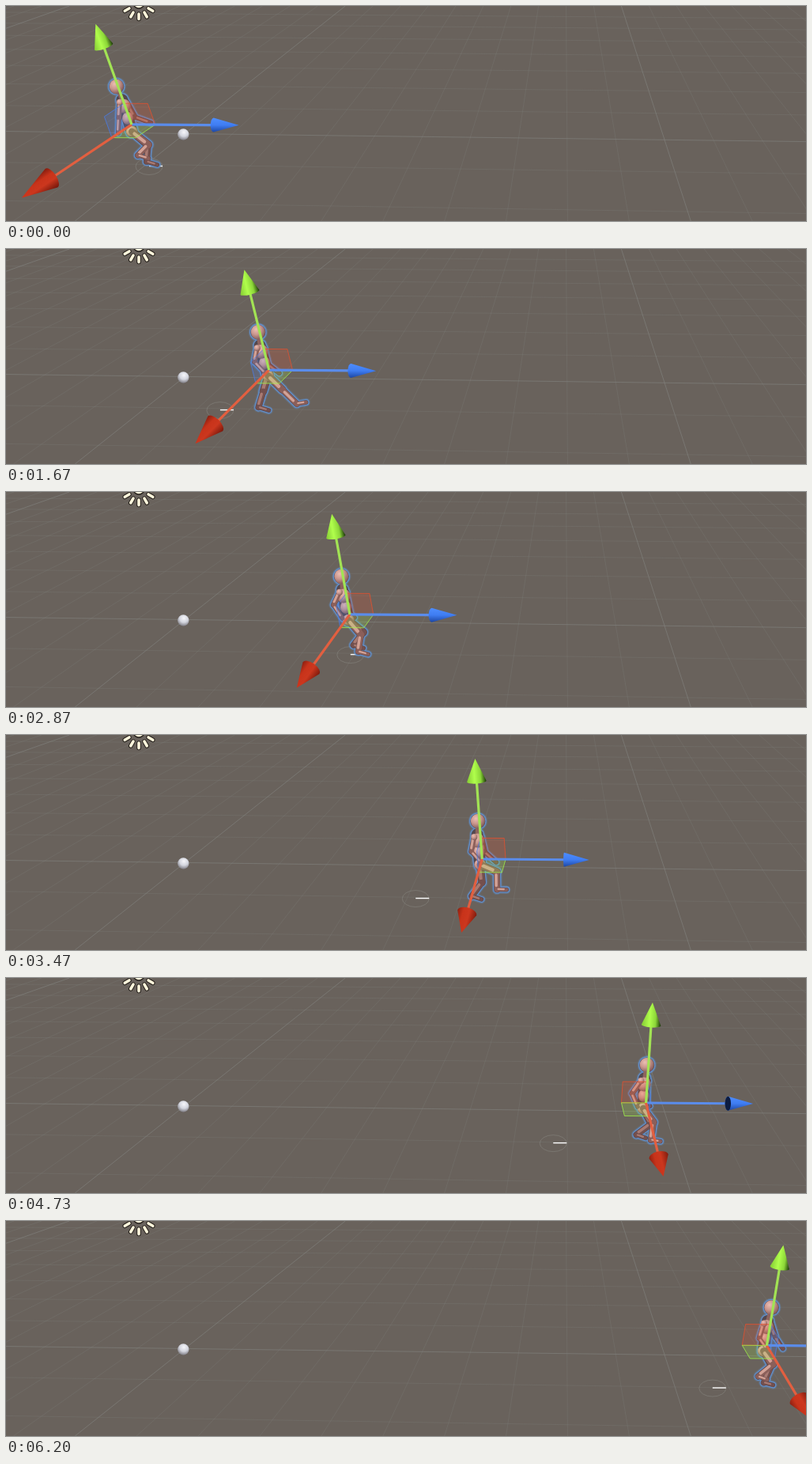
An HTML page that plays this animation: 1012x272 px, repeating every 6.27 s.

```html
<!DOCTYPE html>
<html lang="en">
<head>
<meta charset="utf-8">
<title>Walking figure in a 3D scene</title>
<style>
html, body { margin: 0; width: 100%; height: 100%; overflow: hidden; background: #69625c; }
svg { display: block; width: 1012px; height: 272px; }
</style>
</head>
<body>
<svg viewBox="0 0 1012 272" xmlns="http://www.w3.org/2000/svg">
  <defs>
    <radialGradient id="ball" cx=".55" cy=".3" r=".75">
      <stop offset="0" stop-color="#f6f6fa"/><stop offset=".5" stop-color="#d3d5de"/><stop offset="1" stop-color="#6f6d74"/>
    </radialGradient>
    <radialGradient id="skin" cx=".36" cy=".32" r=".8">
      <stop offset="0" stop-color="#ecbdb2"/><stop offset=".45" stop-color="#c9968d"/><stop offset="1" stop-color="#6d4a4b"/>
    </radialGradient>
    <linearGradient id="red" gradientUnits="userSpaceOnUse" x1="0" y1="-13" x2="0" y2="13">
      <stop offset="0" stop-color="#7d1a0d"/><stop offset=".4" stop-color="#cc371e"/><stop offset=".7" stop-color="#c8331a"/><stop offset="1" stop-color="#8c1f10"/>
    </linearGradient>
    <linearGradient id="green" gradientUnits="userSpaceOnUse" x1="0" y1="-12" x2="0" y2="12">
      <stop offset="0" stop-color="#86cc35"/><stop offset=".4" stop-color="#b0fe4c"/><stop offset=".72" stop-color="#8cd638"/><stop offset="1" stop-color="#1c390a"/>
    </linearGradient>
    <linearGradient id="blue" gradientUnits="userSpaceOnUse" x1="0" y1="-9" x2="0" y2="9">
      <stop offset="0" stop-color="#4d8dff"/><stop offset=".5" stop-color="#3f7df2"/><stop offset="1" stop-color="#1d47a4"/>
    </linearGradient>
  </defs>
  <rect width="1012" height="272" fill="#69625c"/>
  <g id="grid" fill="none"></g>
  <g id="sun" stroke-linecap="round"></g>
  <circle cx="224.3" cy="162.5" r="7.2" fill="url(#ball)"/>
  <g id="ring" fill="none">
    <ellipse rx="17" ry="10.5" stroke="#8e8f88" stroke-opacity=".45"/>
    <path d="M0-.5H17" stroke="#fff" stroke-width="1.4"/>
  </g>
  <g id="body" stroke-linecap="round" stroke-linejoin="round"></g>
  <g id="gizmo"></g>
</svg>
<script>
const LOOP = 6270, STEP = 66.62;
const IDLE = 1130, WALK = 1890, CYCLE = 955;
const { sin, cos, max, min, PI, hypot, sqrt } = Math;
const el = id => document.getElementById(id);
const add = (...v) => v.reduce((a, b) => [a[0] + b[0], a[1] + b[1]]);
const mul = (v, k) => [v[0] * k, v[1] * k];
const mix = (a, b, k) => add(mul(a, 1 - k), mul(b, k));

// Horizontal sideways lean of the vertical axis, caused by perspective
const leanAt = x => -45 + .083 * (x - 167);

// Middle joint of a limb with two equal bones
function bend(a, b, len, side) {
  const v = add(b, mul(a, -1)), d = hypot(...v);
  const out = sqrt(max(0, len * len - d * d / 4)) * side / d;
  return add(mix(a, b, .5), [v[1] * out, -v[0] * out]);
}

// Joints around the figure's centre; w is the gait angle, k the crouch
function pose(w, k) {
  const go = 1 - k;
  const head = [-2, -48], neck = [-4 + 3 * k, -31], hip = [-3, 7 + 2 * k];
  const leg = (w, shift) => {
    const s = sin(w - .25) * go, lift = max(0, cos(w - .6)) * go;
    const ankle = add([25 * s, 47 - 9 * lift], mul(shift, k));
    return [hip, bend(hip, ankle, 22.5, 1), ankle, add(ankle, [12, 4 - 6 * max(0, s)])];
  };
  const arm = (dx, hand) => {
    const shoulder = add(neck, [dx, 3]);
    return [shoulder, bend(shoulder, hand, 19, -1), hand];
  };
  const c = cos(w) * go;
  return {
    spine: [head, neck, hip],
    farLeg: leg(w, [2, 0]), nearLeg: leg(w + PI, [-6, -8]),
    farArm: arm(5, [13 - 8 * c + 12 * k, 4 - 6 * k]),
    nearArm: arm(-4, [-4 - 6 * c - 17 * k, 5 + 6 * k])
  };
}

function drawGrid() {
  const vx = 707, vy = -221;
  let h = '';
  const line = (x1, y1, x2, y2, major) => {
    h += `<path d="M${x1} ${y1}L${x2} ${y2}" stroke="#858883" stroke-opacity="${major ? .55 : .22}"/>`;
  };
  for (let k = -16; k < 20; k++) {
    const m = -1.257 + .158 * k;
    line(vx - m * vy, 0, vx + m * (272 - vy), 272, k % 10 === 0);
  }
  for (let k = -2; k < 8; k++) {
    const d = 386 / (1 + .094 * k), r = .0129 * d / 386;
    line(0, d + vy - 500 * r, 1012, d + vy + 512 * r, k === 0);
  }
  el('grid').innerHTML = h;
}

function drawSun() {
  let rays = '';
  for (let a = -PI / 3; a < 1.1; a += PI / 6) {
    rays += `M${168 + 14 * sin(a)} ${-4 + 14 * cos(a)}L${168 + 20.5 * sin(a)} ${-4 + 20.5 * cos(a)}`;
  }
  el('sun').innerHTML =
    `<path d="${rays}" stroke="#25211c" stroke-width="5.6"/><path d="${rays}" stroke="#fff6dc" stroke-width="3.6"/>` +
    '<circle cx="168" cy="-4" r="7" fill="#fff6dc" stroke="#25211c" stroke-width="1.5"/>';
}

function drawBody(x, y, w, k) {
  const lean = leanAt(x) / 127;
  const place = list => list.map(([px, py]) => [x + px - py * lean, y + py]);
  const { spine, farLeg, nearLeg, farArm, nearArm } = pose(w, k);
  const [head, neck, hip] = place(spine);
  const bones = (list, ...widths) => {
    const p = place(list);
    return widths.map((w, i) => [p[i], p[i + 1], w]);
  };
  const far = [...bones(farLeg, 8.5, 7, 4.5), ...bones(farArm, 6, 5)];
  const near = [...bones(nearLeg, 8.5, 7, 4.5), ...bones(nearArm, 6, 5)];
  const line = (a, b, w, c) => `<path d="M${a}L${b}" stroke="${c}" stroke-width="${w}"/>`;
  const oval = (c, rx, ry = rx, fill = 'url(#skin)') =>
    `<ellipse cx="${c[0]}" cy="${c[1]}" rx="${rx}" ry="${ry}" fill="${fill}"/>`;
  const limbs = (list, dark, light) => list.map(([a, b, w]) => {
    const shine = q => add(q, [-1, -.6]);
    return line(a, b, w, dark) + line(shine(mix(a, b, .2)), shine(mix(a, b, .8)), w * .5, light) +
      oval(b, w * .4, w * .4, dark);
  }).join('');
  const shell = (grow, c) => [...far, ...near, [neck, hip, 14]]
    .map(([a, b, w]) => line(a, b, w + grow, c)).join('') + oval(head, 9 + grow / 2, 9 + grow / 2, c);

  el('body').innerHTML =
    `<g opacity=".35">${shell(6, '#5f8fca')}</g>` + shell(3.6, '#6390ca') + shell(1, '#54484e') +
    limbs(far, '#74504e', '#a87a72') + line(neck, head, 5, '#8d635e') +
    oval(mix(neck, hip, .58), 7, 8) + oval(mix(neck, hip, .2), 8.5, 9) + oval(hip, 7.5, 7) +
    limbs(near, '#8b5f5a', '#d3a296') + oval(near[3][0], 4) + oval(head, 9, 9.3);
}

function drawGizmo(x, y) {
  const o = [x, y], d = x - 167;
  const up = [leanAt(x), -127], ahead = [135.5, 1], out = [-137 + .27 * d - .000035 * d * d, 93];
  const G = mul(up, .21), B = mul(ahead, x < 690 ? .22 : -.23), R = mul(out, .18);
  const quad = (u, v, c) =>
    `<path d="M${o}L${add(o, u)}L${add(o, u, v)}L${add(o, v)}Z" fill="${c}" fill-opacity=".2" stroke="${c}" stroke-opacity=".8"/>`;
  const arrow = (v, k, w, depth, color, fill, base) => {
    const len = hypot(...v) * (1 - k), turn = Math.atan2(v[1], v[0]) * 180 / PI;
    return `<path d="M${o}L${add(o, mul(v, k))}" stroke="${color}" stroke-width="3.2"/>` +
      `<g transform="translate(${add(o, v)}) rotate(${turn})">` +
      `<path d="M0 0L${-len} ${-w}A${depth} ${w} 0 0 0 ${-len} ${w}Z" fill="url(#${fill})"/>` +
      (base ? `<ellipse cx="${-len}" rx="${depth}" ry="${w}" fill="${base}"/>` : '') + '</g>';
  };
  const tilt = min(4, max(.8, Math.abs(x - 640) / 45));
  const redWidth = 10 + .025 * hypot(...out);

  el('gizmo').innerHTML =
    quad(G, R, '#4a7ce6') + quad(G, B, '#e5512f') + quad(B, R, '#9ff04a') +
    arrow(ahead, .765, 9, tilt, '#5a8ceb', 'blue', x > 660 ? '#0d1c40' : '') +
    arrow(out, .73, redWidth, 6.5, '#e25f40', 'red') +
    arrow(up, .775, 12.3, 3, '#a2e354', 'green');
}

function render(ms) {
  const n = Math.floor((ms - 1262) / STEP);
  const t = ms < IDLE ? 0 : n < 0 ? IDLE : 1270 + n * STEP;
  const u = ((t - WALK + 2 * CYCLE) % CYCLE) / CYCLE;
  const w = 2 * PI * u;
  // The ring moves evenly; the figure runs ahead of it and snaps back each cycle.
  const ring = t < 1270 ? 181 : 335 + .1375 * (t - 2136);
  const x = t < IDLE ? 159
    : t < WALK ? 167 + .307 * (t - IDLE)
    : ring - 4 + 124 * u + 9 * sin(PI * u) ** 2;
  const y = 150 + 8 * sin((x - 167) / 410);
  const crouch = min(1, max(0, (1300 - t) / 200));

  el('ring').setAttribute('transform', `translate(${ring} ${203 + (ring - 180) * .012})`);
  drawBody(x, y, w, crouch);
  drawGizmo(x, y);
}

drawGrid();
drawSun();
const start = performance.now();
function tick() {
  render((performance.now() - start) % LOOP);
  requestAnimationFrame(tick);
}
tick();
</script>
</body>
</html>
```
